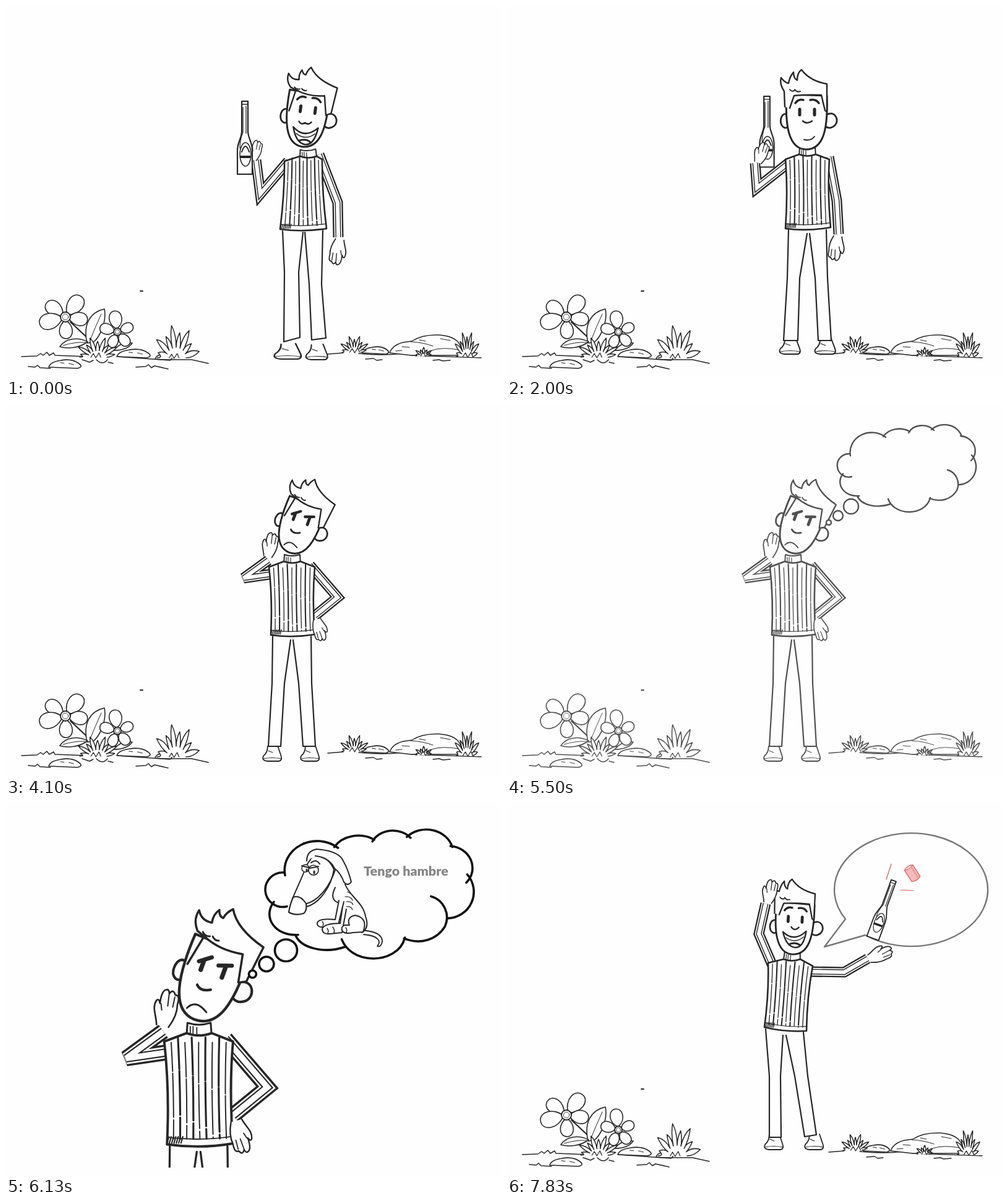
These frames come from a looping animation (800x600 px, 8000 ms). An HTML page:

```html
<!DOCTYPE html>
<html lang="es">
<head>
<meta charset="utf-8">
<style>
html, body { margin: 0; width: 100%; height: 100%; overflow: hidden; background: #fefefe; }
svg { display: block; width: 100vw; height: 100vh; }
</style>
</head>
<body>
<svg id="stage" viewBox="0 0 800 600"></svg>
<script>
const INK = '#262626', PAPER = '#fefefe';

const line = (d, w = 2, extra = '') => `<path d="${d}" fill="none" stroke-width="${w}" ${extra}/>`;
const shape = (d, w = 2, extra = '') => `<path d="${d}" stroke-width="${w}" ${extra}/>`;
const circle = (x, y, r, w = 2) => `<circle cx="${x}" cy="${y}" r="${r}" stroke-width="${w}"/>`;
const place = (x, y, rot, s, body) =>
  `<g transform="translate(${x} ${y}) rotate(${rot}) scale(${s})">${body}</g>`;
const mix = (a, b, t) => [a[0] + (b[0] - a[0]) * t, a[1] + (b[1] - a[1]) * t];

// ---------- the man ----------
const moods = {
  calm: eyes() + line('M-7 -1 Q0 5 8 -1', 2.5) + line('M-5 29 Q6 32 12 24', 2),
  grin: eyes() + line('M-12 5 Q-8 11 -2 6 Q4 10 8 4', 2.5) + grin(7),
  laugh: eyes() + line('M-6 -2 Q0 6 7 -2', 2.5) + grin(-1),
  sulk: line('M-19 -17 L-7 -26 M3 -20 L17 -25', 4.5) + line('M-14 -20 V-9 M11 -21 V-9', 5) +
    line('M-12 8 Q-6 14 4 8', 3) + line('M-14 36 Q-8 23 8 33', 2)
};

const hairs = {
  spiky: shape('M-36 -24 L-37 -49 Q-45 -61 -42 -71 Q-36 -63 -30 -62 Q-28 -73 -22 -80 Q-22 -70 -16 -67 ' +
      'Q-16 -79 -9 -84 Q4 -66 32 -61 L32 -16 L29 -18 L23 -43 Q0 -44 -21 -42 L-28 -22', 2.4) +
    line('M-28 -52 q3 4 7 2 M-20 -52 q3 5 9 3', 2),
  swept: shape('M-30 -10 L-23 -45 L-32 -48 Q-41 -58 -38 -70 Q-32 -60 -20 -62 Q-22 -71 -17 -78 Q-15 -71 -10 -71 ' +
      'Q-9 -78 -3 -84 Q8 -65 43 -56 L38 -14 L30 -10 L24 -41 Q-2 -36 -23 -45', 2.4) +
    line('M-26 -49 q4 4 9 2 M-14 -48 q4 4 8 2', 2)
};

function eyes() {
  return line('M-12 -20 V-11 M12 -20 V-11', 5) + line('M-19 -30 Q-14 -37 -6 -35 M5 -35 Q14 -37 19 -30', 3.5);
}

function grin(y) {
  return `<g transform="translate(0 ${y})">` +
    shape('M-20 8 Q0 26 20 5 Q17 34 2 34 Q-13 33 -20 8Z', 2.5) +
    line('M-14 18 Q2 28 16 15', 1.5) + line('M-8 29 Q2 24 10 29', 3) + '</g>';
}

function head([x, y, rot, s, mood, hair]) {
  return place(x, y, rot, s,
    shape('M-31 -11 C-41 -17 -45 -2 -41 6 Q-36 13 -30 8', 2.8) +
    shape('M31 -11 C45 -19 53 -2 45 6 Q37 13 30 8', 2.8) +
    shape('M-33 -44 C-36 6 -30 44 -2 45 C26 45 34 14 32 -42Z', 3) +
    hairs[hair] + moods[mood]);
}

function torso([tl, tr, br, bl], [nx, ny]) {
  const left = mix(mix(tl, bl, .5), tr, .06), right = mix(mix(tr, br, .5), tl, .06);
  const hem = mix(mix(bl, br, .5), mix(tl, tr, .5), -.05);
  const tilt = Math.atan2(tr[1] - tl[1], tr[0] - tl[0]) * 180 / Math.PI;
  let stripes = '';
  for (let i = 1; i < 10; i++) {
    const top = mix(tl, tr, i / 10), bottom = mix(bl, br, i / 10);
    const a = mix(top, bottom, i % 2 ? .01 : -.04), b = mix(top, bottom, .95), c = mix(mix(a, b, .5), i < 5 ? tr : tl, .03);
    stripes += line(`M${a} Q${c} ${b}`, i % 2 ? 1.3 : 2.1, `stroke-dasharray="${28 + i * 3} 2 47 3"`);
  }
  let ribs = '';
  for (let i = 0; i < 7; i++) ribs += `M${mix(mix(bl, br, i / 28), tl, .01)} l2 -7`;
  return place(nx, ny, tilt, 1, shape('M-13 3 L-12 -11 Q0 -7 13 -11 L14 3', 2) +
      line('M-9 -7 v9 M-6 -7 v9 M-2 -6 v8', 1.2)) +
    shape(`M${tl} L${nx - 13} ${ny} Q${nx} ${ny + 5} ${nx + 14} ${ny} L${tr} Q${right} ${br} Q${hem} ${bl} Q${left} ${tl}Z`, 2.6) +
    stripes + line(ribs, 1.4) + line(`M${mix(bl, tl, .07)} Q${mix(hem, mix(tl, tr, .5), .07)} ${mix(br, tr, .07)}`, 1.2);
}

// Nested strokes leave parallel knit lines along the sleeve.
function sleeve(d, w = 17) {
  const layers = [[w, INK], [w - 4.6, PAPER], [w - 8, INK], [w - 10.8, PAPER]];
  return layers.map(([width, color]) =>
    `<path d="${d}" fill="none" stroke="${color}" stroke-width="${width}" stroke-linejoin="miter" stroke-linecap="butt"/>`).join('');
}

const hand = ([x, y, rot, s = 1]) => place(x, y, rot, s,
  shape('M-6 17 C-8 8 -14 2 -11 -6 Q-9 -9 -7 -4 Q-8 -16 -4 -18 Q-1 -20 0 -15 Q3 -21 6 -15 Q11 -16 10 -6 Q12 4 6 17', 1.6) +
  line('M-6 -4 L-4 2 M0 -14 L1 -3 M6 -13 L6 -3', 1.2));

const shoe = ([x, y, s = 1]) => place(x, y, 0, `${s} 1`,
  shape('M-8 -24 Q-8 -14 -15 -9 Q-20 -1 -8 0 H12 Q19 -1 16 -9 L10 -25', 2) + line('M-15 -4 Q0 -7 16 -4 M-7 -17 l8 3', 1.2));

const bottle = ([x, y, rot, s]) => place(x, y, rot, s,
  shape('M-5 0 H5 V50 C6 62 12 66 12 80 V118 H-12 V80 C-12 66 -6 62 -5 50Z', 2.2) +
  line('M-5 5 H5 M-3 10 V50 Q-8 62 -8 76 M2 8 V52', 1.3) +
  '<ellipse cx="1" cy="86" rx="9" ry="19" stroke-width="1.5"/>' +
  line('M-6 90 H8', 4) + line('M-5 82 Q1 64 7 82', 2));

function man(p) {
  const held = p.bottle ? bottle(p.bottle) : '';
  const hands = p.hands.map(hand).join('');
  return p.shoes.map(shoe).join('') + p.legs.map(d => shape(d, 2.2)).join('') + (p.gap || '') +
    p.arms.map(d => sleeve(d)).join('') + torso(p.torso, p.neck) + head(p.head) +
    (p.gripFront ? held + hands : hands + held);
}

const holdPose = {
  torso: [[450, 251], [511, 248], [518, 360], [443, 361]], neck: [488, 243],
  head: [486, 183, 7, 1, 'grin', 'swept'],
  legs: ['M447 364 L450 430 L449 543 L475 536 L473 430 L480 366', 'M483 366 L490 450 L494 540 L517 537 L510 450 L512 363'],
  shoes: [[455, 571, 1.3], [502, 572, 1.05]],
  arms: ['M506 240 L536 318 L537 374', 'M456 251 L411 304 L404 249'],
  hands: [[536, 397, 190, 1.15], [403, 234, 15, .9]],
  bottle: [386, 154, 0, 1]
};
const calmPose = {
  torso: [[450, 248], [521, 248], [523, 358], [450, 360]], neck: [485, 240],
  head: [485, 187, 0, 1, 'calm', 'spiky'],
  legs: ['M455 362 L453 440 L447 541 L470 541 L473 440 L485 368', 'M489 368 L498 440 L503 541 L524 541 L518 440 L516 362'],
  shoes: [[457, 563], [514, 563]],
  arms: ['M520 244 L533 315 L536 369', 'M456 253 L404 294 L401 254'],
  hands: [[532, 391, 188, 1.1], [411, 238, 20, .95]],
  bottle: [420, 146, 0, .97], gripFront: true
};
const drinkPose = {
  ...holdPose, head: [486, 185, 0, 1, 'calm', 'spiky'],
  arms: ['M506 240 L536 318 L537 374', 'M456 255 L380 278 L408 215'],
  hands: [[536, 397, 190, 1.15], [413, 198, 20, .95]],
  bottle: [474, 213, 114, .88], gripFront: true
};
const lookPose = {
  ...calmPose,
  arms: ['M520 244 L533 315 L536 369', 'M456 253 L401 300 L391 255'],
  hands: [[532, 391, 188, 1.1], [389, 238, 10, .9]],
  bottle: [373, 158, 0, 1], gripFront: false
};
const tossPose = {
  torso: [[460, 256], [532, 268], [508, 381], [444, 368]], neck: [497, 255],
  head: [512, 203, 14, .97, 'calm', 'spiky'],
  legs: ['M447 372 L439 448 L478 548 L498 530 L465 445 L475 385', 'M507 382 L489 450 L476 548 L452 545 L462 450 L471 385'],
  gap: line('M476 385 L465 448', 4),
  shoes: [[491, 566, .9], [457, 574, .95]],
  arms: ['M527 262 L541 339 L505 376', 'M466 256 L433 313 L388 285'],
  hands: [[370, 277, -70, 1]],
  bottle: [364, 258, 32, .84], gripFront: true
};
const thinkPose = {
  torso: [[425, 262], [499, 262], [499, 371], [428, 372]], neck: [462, 253],
  head: [474, 198, 20, .97, 'sulk', 'swept'],
  legs: ['M431 374 L430 450 L424 552 L444 552 L450 450 L460 380', 'M464 380 L473 450 L480 552 L500 552 L494 450 L493 374'],
  shoes: [[430, 576, .9], [491, 576, .9]],
  arms: ['M491 259 L536 311 L499 341', 'M432 273 L384 280 L424 251'],
  hands: [[507, 363, 165, 1], [427, 227, 12, 1.1]]
};
const cheerPose = {
  torso: [[422, 257], [494, 262], [484, 367], [416, 361]], neck: [460, 251],
  head: [465, 201, 3, .94, 'laugh', 'spiky'],
  legs: ['M418 364 L424 440 L424 539 L443 539 L442 440 L446 374', 'M451 374 L465 440 L481 538 L500 535 L486 440 L479 369'],
  shoes: [[431, 559, .9], [496, 559, .9]],
  arms: ['M431 266 L407 210 L418 161', 'M486 271 L545 272 L583 250'],
  hands: [[425, 142, 12, 1.05], [603, 243, 68, 1.1]]
};

// ---------- scenery ----------
const petal = (x, y, rot, len, w) => place(x, y, rot, 1,
  shape(`M5 0 C${len * .4} ${-w} ${len} ${-w * .9} ${len} 0 C${len} ${w * .9} ${len * .4} ${w} 5 0Z`, 1.6));

function flower(x, y, r, petals) {
  return petals.map(([rot, len]) => petal(x, y, rot, len, len * .42)).join('') +
    circle(x, y, r, 1.9) + circle(x, y, r * .6, .8);
}

// A fan of leaf-shaped blades.
function tuft(x, y, w, h, n) {
  const at = (angle, r, lift = r) => [x + Math.cos(angle) * w * r, y - Math.sin(angle) * h * lift];
  let d = `M${x - w * .8} ${y}`;
  for (let i = 0; i < n; i++) {
    const from = Math.PI * (1 - i / n), to = Math.PI * (1 - (i + 1) / n);
    const reach = i % 2 ? 1 : .78;
    d += ` Q${at(from, .7 * reach)} ${at((from + to) / 2, reach)} Q${at(to, .72 * reach)} ${at(to, .42, .32)}`;
  }
  return shape(d, 1.5) + line(`M${x - w * .3} ${y} l4 -6 l4 7 l5 -8 l3 7`, 1.3);
}

const rock = (x, y, w, h) => shape(`M${x - w} ${y} Q${x - w * .9} ${y - h * .7} ${x - w * .3} ${y - h * .9}
  Q${x + w * .4} ${y - h * 1.2} ${x + w * .8} ${y - h * .5} Q${x + w * 1.1} ${y} ${x + w * .7} ${y + 2} Z`, 1.6) +
  line(`M${x - w * .3} ${y - h * .6} l6 1 M${x + w * .2} ${y - h * .5} l8 2`, 1);

const flowerBed =
  line('M25 567 L50 566 l6 -4 l4 3 l6 -5 l4 5 l7 -4 l2 4 L130 567 M36 583 l11 1 l4 -3 l4 4 L72 586', 1.5) +
  line('M104 511 L133 538 M178 534 Q172 545 174 556', 2.2) +
  shape('M131 545 C124 515 136 495 159 490 C163 510 152 535 141 544Z', 1.6) + line('M136 540 Q144 520 154 498', 1) +
  shape('M87 551 C96 537 116 535 132 543 C119 553 100 555 87 551Z', 1.6) + line('M92 549 Q112 543 128 544', 1) +
  shape('M174 557 Q186 542 204 545 Q196 557 174 557Z', 1.6) +
  flower(96, 503, 8, [[-143, 38], [-52, 42], [8, 36], [88, 35], [165, 43]]) +
  flower(180, 527, 6, [[-165, 29], [-98, 34], [-22, 27], [50, 28], [114, 27]]) +
  rock(207, 567, 28, 12) + rock(255, 571, 14, 8) + tuft(148, 568, 36, 33, 9) + tuft(275, 569, 38, 53, 8) +
  rock(96, 584, 27, 12) +
  line('M123 572 l12 4 l6 -3 M146 572 q10 10 18 0 M165 576 l8 2 M180 567 L250 572 L300 572 L327 578 M210 584 L226 583 l4 -3 l5 5 l5 -3 L262 587', 1.5) +
  line('M217 461 h4', 1.8);

const rockBed =
  line('M520 563 L545 561 M570 562 Q610 566 640 562 M655 565 L768 569 M581 571 l13 -1 l5 3 l9 -1 M690 573 l10 -1 l6 2 l12 -1', 1.4) +
  rock(598, 561, 22, 10) +
  shape('M620 561 Q625 548 642 544 L656 542 Q672 531 700 532 Q726 534 733 547 L742 565 L655 565Z', 1.5) +
  line('M654 543 Q674 544 690 550 M668 540 l10 2 M640 551 l12 1 M688 557 Q705 551 732 556 M702 538 l16 3 M630 558 l10 -1', 1) +
  tuft(563, 560, 25, 27, 9) + tuft(675, 566, 16, 14, 7) + tuft(745, 567, 22, 41, 9);

const garden = flowerBed + rockBed;

function basket() {
  let mesh = '';
  for (let i = 0; i < 7; i++) {
    const rise = 414 + i * 38, fall = 290 + i * 52;
    mesh += `M190 ${rise} Q265 ${rise - 48} 350 ${rise - 97} M190 ${fall} Q265 ${fall + 72} 350 ${fall + 190} `;
  }
  return '<clipPath id="mesh"><path d="M186 378 L346 382 L314 572 L203 570Z"/></clipPath>' +
    `<g clip-path="url(#mesh)">${line(mesh, 2.2)}</g>` +
    line('M186 379 L203 570 M346 383 L314 572', 2.6) +
    shape('M203 568 Q260 573 315 565 Q324 567 328 576 Q262 590 194 576 Q194 570 203 568Z', 2.4) +
    shape('M181 364 Q265 359 350 367 Q357 369 355 382 Q353 385 346 383 Q265 375 181 379 Q175 379 175 371 Q176 364 181 364Z', 2.6);
}

const cloud =
  line('M557 116 A18.8 18.8 0 1 1 554 79 M555 82 A35 32 0 0 1 612 52 M608 51 A30 25 0 0 1 651 43 ' +
    'M649 45 A24 20 0 0 1 690 41 M686 40 A29 26 0 0 1 735 51 M733 50 A26 24 0 0 1 750 90 M751 81 A29 29 0 0 1 730 129', 2.4) +
  line('M712 105 C726 109 733 125 727 138 C718 153 700 158 683 151 M684 150 C680 166 664 173 650 173 C632 173 620 163 616 152 ' +
    'M620 160 C598 168 572 162 566 147 M569 147 C545 149 530 128 543 111', 2.4) +
  circle(556, 164, 12, 2.4) + circle(535, 179, 8, 2.4) + circle(520, 190, 4, 2.4);

const dog =
  line('M532 135 Q522 155 538 160 M548 130 C556 150 578 160 581 182 Q588 200 575 208', 2) +
  line('M575 204 C598 206 609 212 608 223 Q606 232 600 230 C607 222 602 213 578 211', 1.8) +
  shape('M538 156 L532 187 Q507 184 503 192 Q502 200 514 199 L537 195 L546 158', 2) +
  shape('M544 166 L540 193 Q514 193 511 202 Q511 211 523 210 L543 208 L550 170', 2) +
  shape('M577 207 Q586 184 564 180 Q550 183 555 196 Q541 194 543 204 Q546 211 560 208 Z', 2) +
  line('M519 201 q3 4 1 8 M528 199 q4 5 2 10 M549 200 q3 3 1 8 M511 190 q3 3 1 7', 1.5) +
  line('M548 150 q10 -1 12 6 M550 158 q9 -1 11 5 M550 166 q8 -1 10 5 M552 142 l5 3', 1.2) +
  shape('M487 97 C478 120 470 136 463 153 Q470 168 486 166 C508 160 526 132 530 106 Q520 82 496 84Z', 2) +
  line('M486 161 C506 156 524 132 533 104 M529 102 l7 3', 2) +
  shape('M486 92 Q486 76 502 73 Q538 76 545 92 Q553 106 558 126 Q552 134 546 126 Q541 112 531 104 Q522 86 500 84', 2) +
  shape('M464 151 Q475 146 485 161 Q487 172 481 177 Q467 181 457 175 Q459 162 464 151Z', 2.2) +
  circle(484, 104, 6, 1.6) + circle(497, 107, 8, 1.7) + line('M486 106 v2 M498 109 v3', 3) +
  line('M478 100 L490 103 M490 104 L505 101 M493 95 Q501 88 507 97', 2);

const hungry = '<text x="578" y="116" font-family="Lato, Open Sans, sans-serif" font-weight="900" font-size="21.5" fill="#858585" stroke="none">Tengo hambre</text>';

const closeUp =
  `<g transform="matrix(1.502 0 0 1.512 -382.6 -12)">${man(thinkPose)}</g>` +
  `<rect y="588" width="800" height="12" fill="${PAPER}" stroke="none"/>` +
  `<g transform="matrix(1.502 0 0 1.479 -382.6 -5.9)" stroke="#111">${cloud}</g>` + dog + hungry;

const speech =
  shape('M547 186 A124 91.5 0 1 1 579 212 L513 231Z', 2.4, 'stroke="#777"') +
  bottle([625, 124, 20, .84]) +
  place(655, 112, -33, 1,
    shape('M-8 -11 Q0 -15 8 -11 V11 Q0 15 -8 11Z', 1.4, 'fill="#f6b9b9" stroke="#cf6b6b"') +
    shape('M-8 -11 Q0 -7 8 -11 Q0 -15 -8 -11Z', 1, 'fill="#fbdcdc" stroke="#cf6b6b"') +
    line('M4 -8 V11', 1.5, 'stroke="#e38a8a"')) +
  line('M621 97 L613 122 M636 139 L657 140', 1.2, 'stroke="#d65a5a"');

// ---------- timeline ----------
const LOOP = 8000, FADE_START = 5500, STEP = 70, FADE_STEPS = 10, BLANK = 4;
const scenes = [
  [0, garden + man(holdPose)],
  [1000, garden + man(drinkPose)],
  [2000, garden + man(calmPose)],
  [2700, garden + man(lookPose)],
  [3400, `<g transform="translate(469 0)">${flowerBed}</g>` + basket() + man(tossPose)],
  [4100, garden + man(thinkPose)],
  [4800, garden + man(thinkPose) + cloud],
  [FADE_START + BLANK * STEP, closeUp],
  [7130, garden + man(cheerPose)],
  [7830, garden + speech + man(cheerPose)]
];

const stage = document.getElementById('stage');
stage.innerHTML = `<rect width="800" height="600" fill="${PAPER}"/>` + scenes.map(([, body]) =>
  `<g class="scene" fill="${PAPER}" stroke="${INK}" stroke-linejoin="round" stroke-linecap="round">${body}</g>`).join('');
const groups = [...stage.querySelectorAll('.scene')];

function render(t) {
  const current = scenes.filter(([start]) => start <= t).length - 1;
  const step = Math.floor((t - FADE_START) / STEP);
  const fading = step >= 0 && step < FADE_STEPS;
  groups.forEach((g, i) => { g.style.display = i === current ? '' : 'none'; });
  groups[current].style.opacity = fading ? Math.abs(step - BLANK) / 5 : 1;
}

const begin = performance.now();
function tick() {
  render((performance.now() - begin) % LOOP);
  requestAnimationFrame(tick);
}
tick();
</script>
</body>
</html>
```
